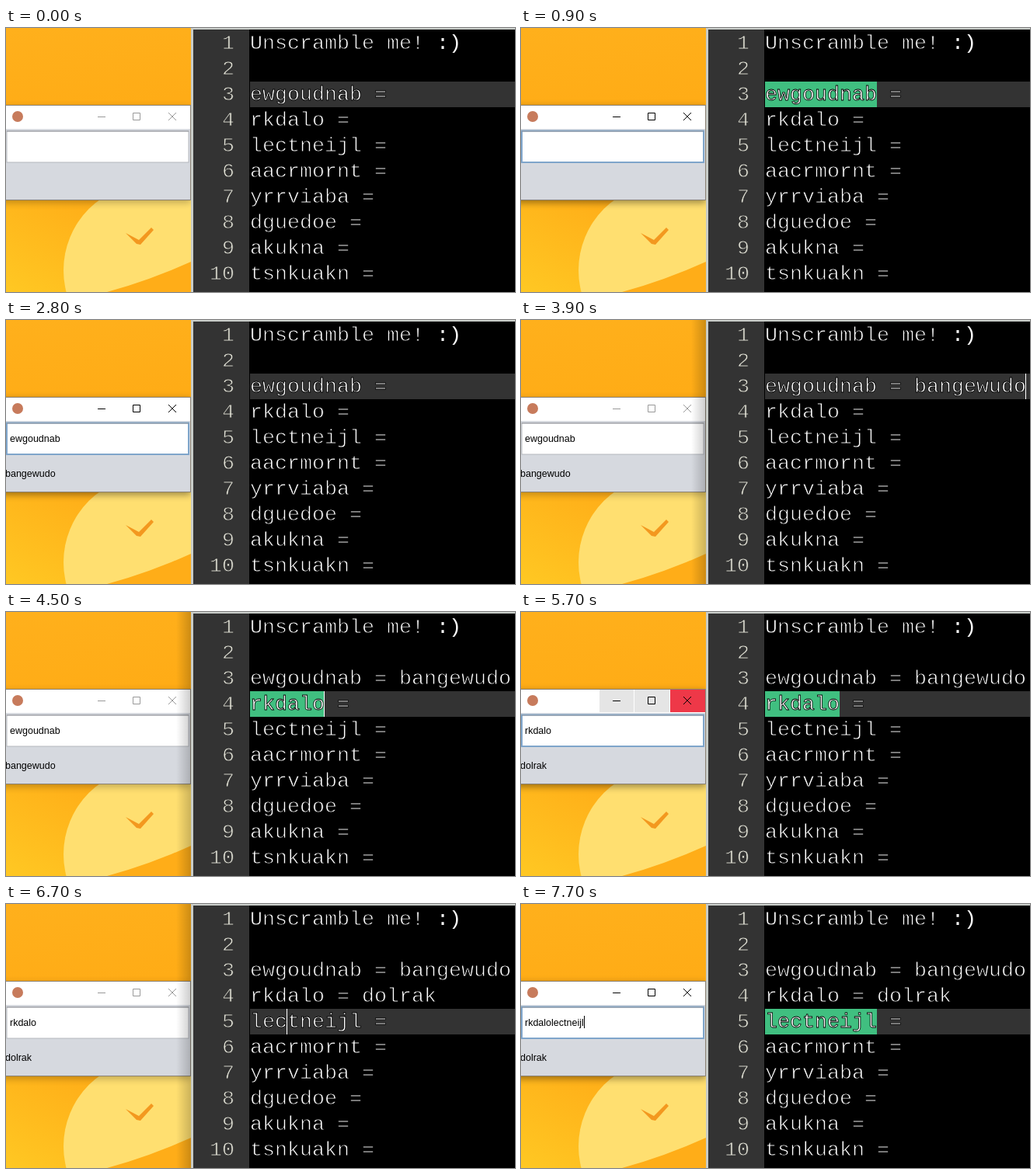
Recreate the animation shown at these times as an HTML page. Size 655 px wide and 340 px high, loop 8 s.

```html
<!DOCTYPE html>
<html lang="en">
<head>
<meta charset="utf-8">
<title>Unscramble me</title>
<style>
  html, body { margin: 0; height: 100%; overflow: hidden; background: #000; }
  svg { display: block; }
  text { white-space: pre; }
  /* the dark outline thins the letters */
  .code { font: 26.67px "Courier New", "Liberation Mono", monospace; fill: #fff; stroke: #000; stroke-width: .8px; }
  .num { fill: #e4e4d8; stroke: #333; text-anchor: end; }
  .ui { font: 12.5px Arial, "Liberation Sans", sans-serif; fill: #000; }
</style>
</head>
<body>
<svg width="655" height="340" viewBox="0 0 655 340">
  <defs>
    <linearGradient id="sky" x2=".3" y2="1">
      <stop offset="0" stop-color="#ffb01c"/>
      <stop offset="1" stop-color="#ffac16"/>
    </linearGradient>
    <linearGradient id="sand" x1="1" x2="0" y2="1">
      <stop offset=".3" stop-color="#ffad18"/>
      <stop offset="1" stop-color="#ffc823"/>
    </linearGradient>
    <linearGradient id="edge">
      <stop offset="0" stop-opacity="0"/>
      <stop offset="1" stop-opacity=".2"/>
    </linearGradient>
    <filter id="blur" x="-20%" width="140%" y="-20%" height="140%"><feGaussianBlur stdDeviation="5"/></filter>
    <clipPath id="desk"><path d="M0 0H238V340H0z"/></clipPath>
  </defs>

  <g clip-path="url(#desk)">
    <path d="M0 0H238V110H0z" fill="url(#sky)"/>
    <path d="M0 210H238V340H0z" fill="url(#sand)"/>
    <circle cx="186" cy="312" r="112" fill="#ffdf70"/>
    <path d="M130 340Q185 325 238 301V340z" fill="#ffad18"/>
    <path d="M154 264L171 273L187 257L190 260L173 279L168 278z" fill="#f3981f"/>
    <path id="shadow" d="M-10 102H238V225H-10z" filter="url(#blur)"/>
  </g>

  <path d="M0 99H238V222H0z" fill="#8b8274"/>
  <path d="M0 100H237V130H0z" fill="#fff"/>
  <path d="M0 130H237V221H0z" fill="#d6d9df"/>
  <circle cx="15" cy="114" r="7" fill="#c77b5c"/>
  <g id="hover">
    <path d="M101 100H145V129H101zM146 100H191V129H146z" fill="#e5e5e5"/>
    <path d="M192 100H237V129H192z" fill="#ee3848"/>
  </g>
  <path id="buttons" d="M118 114.5H128M163.5 109.5H172.5V118.5H163.5zM209 109L219 119M219 109L209 119" fill="none"/>
  <rect id="field" x="1" y="132.5" width="234" height="40.5" fill="#fff"/>
  <path d="M1 133H235" stroke="#8f9298"/>
  <rect id="fieldSel" x="5" y="144" width="65" height="16" fill="#39698a"/>
  <text id="input" class="ui" x="5" y="157"></text>
  <rect id="fieldCaret" y="144" width="1" height="16"/>
  <text id="label" class="ui" x="-1" y="202"></text>
  <path id="edgeShadow" d="M219 0H238V340H219z" fill="url(#edge)"/>

  <path d="M238 0H655V340H238z" fill="#c8ccc8"/>
  <path d="M241 2H655V340H241z" fill="#000"/>
  <path d="M241 2H313V340H241z" fill="#333"/>
  <rect id="band" x="314" width="341" height="33" fill="#333"/>
  <rect id="sel" x="314" height="33" fill="#40bf80"/>
  <g id="lines"></g>
  <rect id="caret" width="1" height="33" fill="#fff"/>
</svg>
<script>
const $ = id => document.getElementById(id);
const set = (id, attrs) => { for (const k in attrs) $(id).setAttribute(k, attrs[k]); };
const show = (id, on) => set(id, { visibility: on ? "visible" : "hidden" });

const LOOP = 8000, ROW = 33, CHAR = 16, LEFT = 314;
const words = ["ewgoudnab", "rkdalo", "lectneijl", "aacrmornt", "yrrviaba", "dguedoe", "akukna", "tsnkuakn"];
const answers = ["bangewudo", "dolrak"];
const rowTop = n => 3 + (n - 1) * ROW;

const lines = ["Unscramble me! <tspan stroke='none'>:)</tspan>", "", ...words.map(w => w + " = ")];
$("lines").innerHTML = lines.map((line, i) => {
  const y = 27 + i * ROW;
  return `<text class="code num" x="294" y="${y}">${i + 1}</text>` +
         `<text class="code" id="line${i + 1}" x="${LEFT}" y="${y}">${line}</text>`;
}).join("");

// focus: which window is active; caret and fieldCaret: x position, 0 when hidden
const start = { focus: "", row: 3, sel: 0, caret: 0, input: "", fieldCaret: 0, fieldSel: 0, label: "", hover: 0, solved: 0 };
const toField = { focus: "field", caret: 0 };
const toEditor = { focus: "editor", fieldCaret: 0, sel: 0, hover: 0 };
const steps = [
  [300, { focus: "editor", caret: 378 }],
  [400, { sel: 9, caret: 457 }],
  [700, { caret: 0 }],
  [900, toField],
  [1000, { fieldCaret: 5 }],
  [1300, { input: words[0], fieldCaret: 70 }],
  [1700, { ...toEditor, caret: 505 }],
  [1900, { caret: 0 }],
  [2100, { caret: 505 }],
  [2300, { ...toField, fieldCaret: 70 }],
  [2700, { label: answers[0] }],
  [2800, { fieldCaret: 0 }],
  [3100, { hover: 1 }],
  [3200, { hover: .5 }],
  [3300, { hover: .15, fieldCaret: 70 }],
  [3400, { ...toEditor, caret: 505 }],
  [3600, { caret: 0 }],
  [3700, { solved: 1 }],
  [3900, { caret: 649 }],
  [4000, { row: 4, caret: 361 }],
  [4100, { sel: 6, caret: 409 }],
  [4300, { caret: 0 }],
  [4500, { caret: 409 }],
  [4700, { ...toField, fieldCaret: 70 }],
  [4800, { fieldSel: 1 }],
  [5100, { input: words[1], fieldCaret: 39, fieldSel: 0 }],
  [5300, { label: answers[1] }],
  [5500, { fieldCaret: 0 }],
  [5700, { hover: 1 }],
  [5800, { hover: .5 }],
  [5900, { hover: .15 }],
  [6000, { hover: 0, fieldCaret: 39 }],
  [6100, { ...toEditor, caret: 457 }],
  [6300, { caret: 0 }],
  [6400, { solved: 2 }],
  [6500, { caret: 553 }],
  [6700, { row: 5, caret: 361 }],
  [6800, { sel: 9, caret: 457 }],
  [7000, { caret: 0 }],
  [7200, { ...toField, fieldCaret: 39 }],
  [7700, { input: words[1] + words[2], fieldCaret: 81 }],
];

function draw(t) {
  const s = Object.assign({}, start, ...steps.filter(([at]) => at <= t).map(([, change]) => change));
  const active = s.focus === "field", y = rowTop(s.row);

  set("shadow", { opacity: active ? .4 : .25 });
  show("edgeShadow", s.focus === "editor");
  set("buttons", { stroke: active ? "#000" : "#999" });
  set("hover", { opacity: s.hover });
  set("field", { stroke: active ? "#7fa5cb" : "#b4b7bd", "stroke-width": active ? 2 : 1 });
  $("input").textContent = s.input;
  set("input", { style: s.fieldSel ? "fill:#fff" : "" });
  $("label").textContent = s.label;
  show("fieldSel", s.fieldSel);
  set("fieldCaret", { x: s.fieldCaret });
  show("fieldCaret", s.fieldCaret);

  set("band", { y });
  set("sel", { y, width: s.sel * CHAR });
  set("caret", { x: s.caret, y });
  show("caret", s.caret);
  answers.forEach((answer, i) => {
    $("line" + (i + 3)).textContent = words[i] + " = " + (i < s.solved ? answer : "");
  });
}

function tick() {
  draw(performance.now() % LOOP);
  requestAnimationFrame(tick);
}
tick();
</script>
</body>
</html>
```
